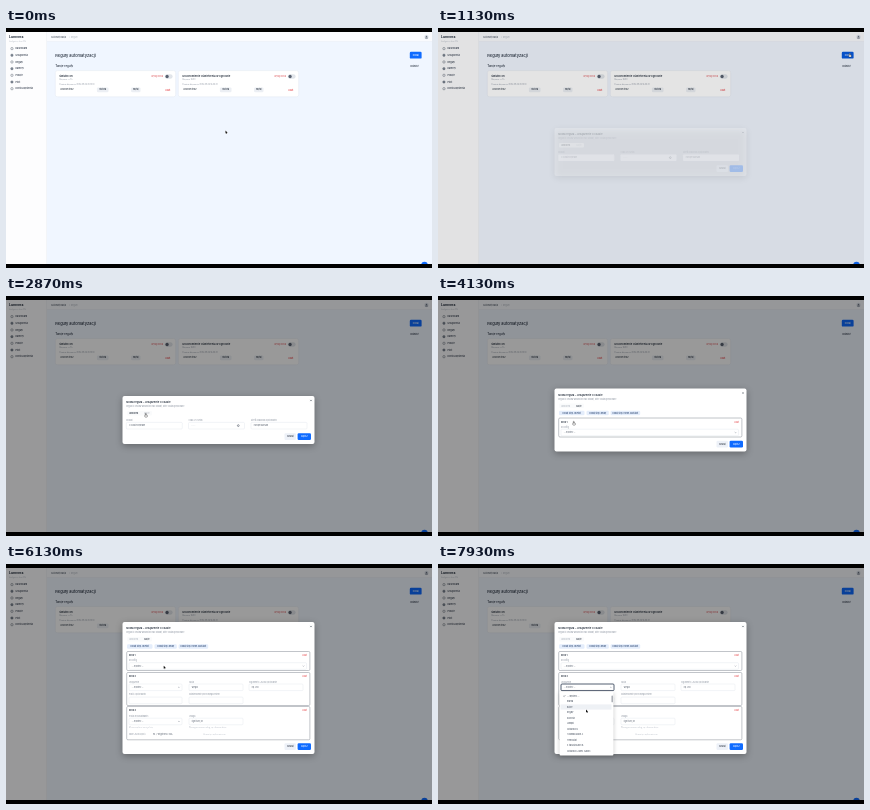
These frames come from a looping animation (426x240 px, 8 s). An HTML page with a canvas:

```html
<!DOCTYPE html>
<html lang="pl">
<head>
<meta charset="utf-8">
<title>Reguły automatyzacji</title>
<style>
html, body { margin: 0; width: 100%; height: 100%; overflow: hidden; background: #000; }
canvas { display: block; width: 426px; height: 240px; }
</style>
</head>
<body>
<canvas id="stage"></canvas>
<script>
const W = 426, H = 240, LOOP = 8000;
const canvas = document.getElementById('stage');
const ctx = canvas.getContext('2d');
const dpr = window.devicePixelRatio || 1;
canvas.width = W * dpr;
canvas.height = H * dpr;

const INK = '#1f2937', GREY = '#858d9a', PALE = '#b3b9c3', BLUE = '#0f6bff', RED = '#e5484d';
const clamp = v => Math.max(0, Math.min(1, v));
const ease = v => v * v * (3 - 2 * v);

// Moments at which the interface reacts
const OPEN = 1107, TAB = 3070, STEP1 = 4130, STEP2 = 4670, STEP3 = 5530, LIST = 7270;
const HEIGHTS = [43, 63, 98, 132];

// Pointer path: time, x, y of the tip
const PATH = [
  [0, 219.5, 102.5], [130, 219.5, 102.5], [930, 411, 25.3], [1230, 411, 25.3],
  [1830, 157, 107], [2200, 133, 117], [2400, 138, 117.8], [2670, 138, 117.8],
  [2870, 139, 117.3], [3470, 139, 117.3], [3800, 135, 125.3], [4160, 135, 125.3],
  [4560, 160.5, 116], [5000, 160.5, 116], [5430, 186, 98.3], [5850, 186, 98.3],
  [6200, 154.5, 102], [6330, 152, 102], [6800, 152, 102], [7130, 148, 122],
  [7600, 148, 122], [7900, 148, 145.5], [LOOP, 148, 145.5]
];

function pointer(t) {
  const i = Math.max(1, PATH.findIndex(p => p[0] > t));
  const a = PATH[i - 1], b = PATH[i];
  const k = ease((t - a[0]) / (b[0] - a[0]));
  return { x: a[1] + (b[1] - a[1]) * k, y: a[2] + (b[2] - a[2]) * k };
}

function rect(x, y, w, h, fill) {
  ctx.fillStyle = fill;
  ctx.fillRect(x, y, w, h);
}

function box(x, y, w, h, r, fill, line, width = 0.4) {
  ctx.beginPath();
  ctx.roundRect(x, y, w, h, r);
  if (fill) { ctx.fillStyle = fill; ctx.fill(); }
  if (line) { ctx.strokeStyle = line; ctx.lineWidth = width; ctx.stroke(); }
}

function disc(x, y, r, fill) {
  ctx.beginPath();
  ctx.arc(x, y, r, 0, 7);
  ctx.fillStyle = fill;
  ctx.fill();
}

function line(points, color, width) {
  ctx.beginPath();
  points.forEach(([x, y]) => ctx.lineTo(x, y));
  ctx.strokeStyle = color;
  ctx.lineWidth = width;
  ctx.stroke();
}

// Text is set large and scaled down to keep fractional glyph positions
function text(s, x, y, size = 2, color = INK, weight = 400, align = 'left') {
  ctx.save();
  ctx.translate(x, y);
  ctx.scale(0.1, 0.1);
  ctx.font = `${weight} ${size * 10}px Inter, "Open Sans", sans-serif`;
  ctx.textAlign = align;
  ctx.textBaseline = 'alphabetic';
  ctx.fillStyle = color;
  ctx.fillText(s, 0, size * 3.6);
  ctx.restore();
}

function button(s, x, y, w, h, fill, color, size = 2, weight = 500) {
  box(x, y, w, h, 1.2, fill);
  text(s, x + w / 2, y + h / 2, size, color, weight, 'center');
}

function chevron(x, y) {
  line([[x - 0.8, y - 0.4], [x, y + 0.4], [x + 0.8, y - 0.4]], '#6b7280', 0.4);
}

function field(x, y, w, value, { select, pale, focus } = {}) {
  box(x, y, w, 6.6, 1, '#fff', focus ? '#27364d' : '#dfe3ea', focus ? 0.8 : 0.4);
  if (value) text(value, x + 2.8, y + 3.4, 1.9, pale ? PALE : '#4b5563');
  if (select) chevron(x + w - 3, y + 3.3);
}

function label(s, x, y) {
  text(s, x, y, 1.9, GREY);
}

function sidebar() {
  rect(0, 4, 41, 232, '#fdfdfe');
  rect(40.6, 4, 0.4, 232, '#e4e9f0');
  text('Lumvera', 3, 8.8, 3.4, INK, 700);
  text('Inteligentny dom 24h', 3, 13, 1.7, PALE);
  const items = ['Dashboard', 'Urządzenia', 'Reguły', 'Kamery', 'Pokoje', 'Pilot', 'Konto asystenta'];
  items.forEach((s, i) => {
    const y = 20.6 + i * 6.68;
    box(4.9, y - 1, 2.1, 2, 0.5, i % 2 ? '#8a929e' : null, '#4b5563', 0.45);
    text(s, 9.5, y, 2.25, '#273142', 500);
  });
}

function card(x, title, sub, date) {
  box(x, 42.6, 120.4, 26.2, 2, '#fff', '#e2e8f1', 0.5);
  text(title, x + 4, 48.2, 2.65, INK, 600);
  text(sub, x + 4, 51.7, 1.8, GREY);
  text(date, x + 4, 56, 1.8, GREY);
  text('Wyłączona', x + 96, 48.4, 2.2, '#e0696d', 500);
  box(x + 109.8, 46.6, 7.3, 3.8, 1.9, '#e3e6eb', '#d3d8df', 0.3);
  disc(x + 111.8, 48.5, 1.65, '#596170');
  text('Uruchom teraz', x + 5, 61.8, 1.85, INK, 500);
  button('Historia', x + 41.6, 59.4, 11.6, 4.8, '#eceff4', INK, 1.9);
  button('Edytuj', x + 75.8, 59.4, 9.4, 4.8, '#eceff4', INK, 1.9);
  text('Usuń', x + 110, 61.8, 2, RED, 600);
}

function page(t) {
  rect(0, 4, W, 232, '#f0f6ff');
  rect(41, 4, W - 41, 9.5, '#fafbfe');
  rect(41, 13.3, W - 41, 0.4, '#e5eaf2');
  sidebar();
  text('Automatyzacja', 45, 9, 2.1, '#4b5563', 500);
  text('/  Reguły', 63, 9, 2.1, '#a8afba');
  disc(420.5, 9, 2.2, '#dfe4ec');
  disc(420.5, 8.5, 0.8, '#6b7280');
  rect(419.3, 9.5, 2.4, 1, '#6b7280');

  text('Reguły automatyzacji', 49.3, 27.2, 3.95, INK, 500);
  text('Twoje reguły', 49.3, 38, 2.9, INK, 500);
  const hover = t > 860 && t < 1300;
  button('Dodaj', 403.8, 23.8, 11.8, 6.8, hover ? '#075ae0' : BLUE, '#fff', 2.2);
  text('Odśwież', 404, 38, 2.1, INK, 500);
  card(49.3, 'Światło on', 'Aktywna: co 1 h', 'Ostatnia aktywacja: 2025-09-03 20:12:10');
  card(172.3, 'Uruchomienie oświetlenia w ogrodzie', 'Aktywna: 18:20', 'Ostatnia aktywacja: 2025-09-03 18:20:01');
  disc(418.5, 237, 3.2, BLUE);
}

function conditions(y) {
  label('Rodzaj', 120.3, y + 24.5);
  label('Czas (24 h:min)', 182.5, y + 24.5);
  label('Strefa czasowa (opcjonalnie)', 245, y + 24.5);
  field(120.3, y + 26.4, 56, 'O czasie wybrane');
  field(182.5, y + 26.4, 56, '--:--', { pale: true });
  ctx.beginPath();
  ctx.arc(232.3, y + 29.6, 0.9, 0, 7);
  ctx.strokeStyle = '#374151';
  ctx.lineWidth = 0.5;
  ctx.stroke();
  field(245, y + 26.4, 56, 'Europe/Warsaw');
}

function step(n, y, h) {
  box(120.7, y, 183.2, h, 1.2, '#fff', '#8d939d', 0.55);
  text('Krok ' + n, 123, y + 4, 2.2, INK, 600);
  text('Usuń', 301, y + 4, 1.9, RED, 500, 'right');
}

function stepRemote(y) {
  step(1, y, 19);
  label('IR config', 123, y + 9.2);
  field(123, y + 11.2, 177.5, '-- wybierz --', { select: true });
}

function stepRelay(y, focus) {
  step(2, y, 33);
  label('Urządzenie', 123, y + 9.5);
  label('Akcja', 183, y + 9.5);
  label('Argumenty (JSON) opcjonalnie', 243, y + 9.5);
  field(123, y + 11.5, 53, '-- wybierz --', { select: true, focus });
  field(183, y + 11.5, 54, 'wyłącz');
  field(243, y + 11.5, 54, 'np. 200');
  label('Pokój (opcjonalnie)', 123, y + 22.3);
  label('Zatwierdzenie przed wyłączeniem', 183, y + 22.3);
  field(123, y + 24.6, 53, '');
  field(183, y + 24.6, 54, '');
}

function stepService(y) {
  step(3, y, 33.3);
  label('Encja (wyszukiwanie)', 123, y + 10);
  label('Usługa', 183, y + 10);
  field(123, y + 11.7, 53, '-- wybierz --', { select: true });
  field(183, y + 11.7, 54, 'light.turn_on');
  text('Możesz wybrać encję z listy', 123, y + 20.6, 1.8, PALE);
  text('Wymagana nazwa usługi, np. domena.akcja', 183, y + 20.6, 1.8, PALE);
  label('Dane JSON (opcj.)', 123, y + 27.4);
  text('ex. {"brightness":255}', 147, y + 27.4, 1.9, '#4b5563');
  text('Usuwać po wykonaniu raz', 197, y + 27.4, 1.8, PALE);
}

function options(tip) {
  ctx.save();
  ctx.shadowColor = 'rgba(0,0,0,.22)';
  ctx.shadowBlur = 4 * dpr;
  ctx.shadowOffsetY = dpr;
  box(121.6, 127.4, 53.8, 64.2, 1, '#fff');
  ctx.restore();
  const names = ['-- wybierz --', 'Brama', 'Bojler', 'Regały', 'Kuchnia', 'Lampki', 'Gniazdko B',
    '1 Klamka Salon A', 'Termostat', '2 Żaluzja Salon B', 'Gniazdko LAMPA (Salon)'];
  names.forEach((s, i) => {
    const y = 132 + i * 5.5;
    if (Math.abs(tip.y - y) < 2.75) rect(122.5, y - 2.6, 51, 5.2, '#eef1f5');
    if (!i) line([[125.4, y], [126.1, y + 0.7], [127.3, y - 0.8]], INK, 0.4);
    text(s, 129, y, 2, '#374151');
  });
  box(173.6, 131.5, 1.1, 6.8, 0.5, '#8b9099');
}

function dialog(t, tip) {
  const actions = t >= TAB;
  const count = [STEP1, STEP2, STEP3].filter(s => t >= s).length;
  const h = actions ? HEIGHTS[count] : 48;
  const y = 124 - h / 2;

  ctx.save();
  ctx.shadowColor = 'rgba(0,0,0,.3)';
  ctx.shadowBlur = 7 * dpr;
  ctx.shadowOffsetY = 2 * dpr;
  box(116.5, y, 192, h, 2, '#fff');
  ctx.restore();

  text('Nowa reguła – urządzenie o czasie', 120.3, y + 6.5, 2.65, INK, 600);
  text('Reguła to zestaw warunków oraz działań, które zostaną wykonane', 120.3, y + 10.5, 1.85, GREY);
  line([[304.4, y + 3.9], [305.6, y + 5.1]], INK, 0.45);
  line([[305.6, y + 3.9], [304.4, y + 5.1]], INK, 0.45);

  box(121, y + 15, 25, 4.6, 1, '#fafbfc');
  text('Warunek', 123.2, y + 17.3, 2.1, actions ? PALE : INK, 500);
  text('Akcje', 138, y + 17.3, 2.1, actions ? INK : PALE, 500);

  if (actions) {
    const add = [['IR/Pilot', 121, 25.5], ['Relay', 148.5, 22.3], ['Home Assistant', 172.6, 29.6]];
    add.forEach(([s, x, w]) => {
      const size = s.length > 10 ? 1.95 : 2.05;
      button('Dodaj step: ' + s, x, y + 22.3, w, 4.5, '#e4edfb', '#24406e', size);
    });
    if (count > 0) stepRemote(y + 29.5);
    if (count > 1) stepRelay(y + 50.5, t >= LIST);
    if (count > 2) stepService(y + 84.5);
  } else {
    conditions(y);
  }

  const foot = y + h - 10.8;
  button('Anuluj', 278.5, foot, 11.5, 6.8, '#edf1f8', INK, 2.1);
  button('Zapisz', 291.6, foot, 13.4, 6.8, BLUE, '#fff', 2.1);
  if (t >= LIST) options(tip);
}

function drawPointer({ x, y }, hand) {
  ctx.save();
  ctx.translate(x, y);
  if (hand) {
    box(0.3, 0, 0.9, 2.4, 0.45, '#fff', '#222', 0.4);
    box(-0.3, 1.7, 2.7, 2.1, 0.8, '#fff', '#222', 0.4);
  } else {
    ctx.beginPath();
    [[0, 0], [0, 3], [0.7, 2.4], [1.2, 3.5], [1.7, 3.2], [1.2, 2.2], [2.2, 2.2]].forEach(p => ctx.lineTo(...p));
    ctx.closePath();
    ctx.strokeStyle = '#fff';
    ctx.lineWidth = 0.7;
    ctx.stroke();
    ctx.fillStyle = '#111';
    ctx.fill();
  }
  ctx.restore();
}

function overButton(t) {
  return [[860, 1300], [2330, 3500], [3740, 4140], [4500, 4680], [5350, 5540]]
    .some(([a, b]) => t >= a && t < b);
}

function draw(t) {
  const tip = pointer(t);
  const shown = clamp((t - OPEN) / 92);
  ctx.setTransform(dpr, 0, 0, dpr, 0, 0);
  rect(0, 0, W, H, '#000');
  page(t);
  rect(0, 4, W, 232, `rgba(0,0,0,${0.4 * shown})`);
  if (shown) {
    ctx.globalAlpha = shown;
    dialog(t, tip);
    ctx.globalAlpha = 1;
  }
  drawPointer(tip, overButton(t));
  rect(0, 236, W, 4, '#000');
}

const start = performance.now();
function tick() {
  draw((performance.now() - start) % LOOP);
  requestAnimationFrame(tick);
}
tick();
</script>
</body>
</html>
```
